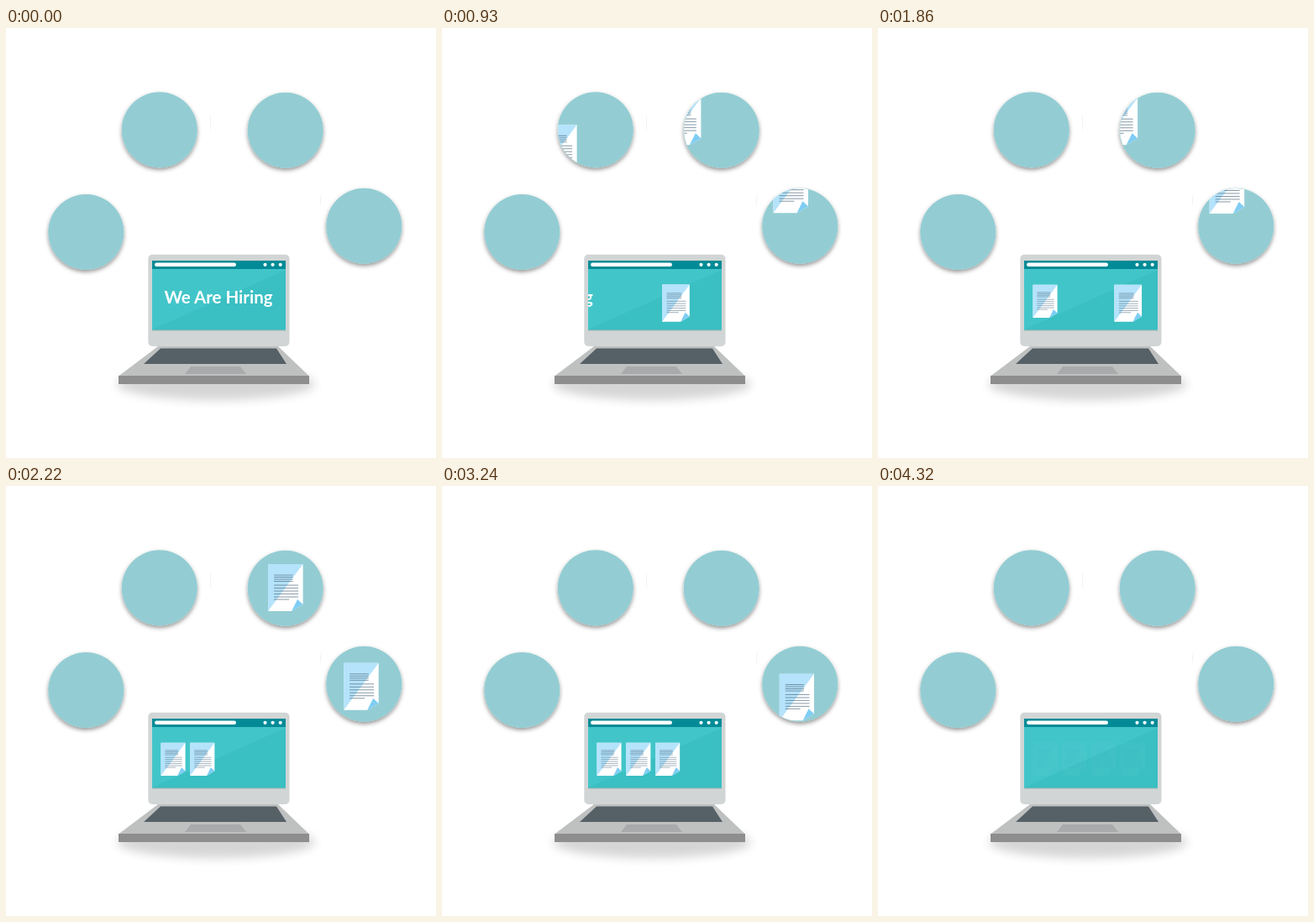
These frames come from a looping animation (512 by 512 pixels, 4.38 s). An HTML page:

```html
<!DOCTYPE html>
<html lang="en">
<head>
<meta charset="utf-8">
<title>We Are Hiring</title>
<style>
html, body { margin: 0; width: 100%; height: 100%; overflow: hidden; background: #fff; }
svg { display: block; width: 100vw; height: 100vh; }
#label { font: 700 20.5px Lato, "Open Sans", sans-serif; fill: #fff; text-anchor: middle; }
</style>
</head>
<body>
<svg viewBox="0 0 512 512">
  <defs>
    <filter id="drop" x="-30%" y="-30%" width="160%" height="160%">
      <feDropShadow dx="0" dy="2.5" stdDeviation="2.6" flood-color="#000" flood-opacity=".42"/>
    </filter>
    <filter id="soft" x="-30%" y="-80%" width="160%" height="260%">
      <feGaussianBlur stdDeviation="6"/>
    </filter>
    <clipPath id="screen"><rect x="174" y="287" width="159" height="73"/></clipPath>
    <clipPath id="windows">
      <rect x="174" y="287" width="159" height="73"/>
      <circle cx="95.3" cy="243" r="44.7"/>
      <circle cx="182.8" cy="121.3" r="44.7"/>
      <circle cx="332.7" cy="121.8" r="44.7"/>
      <circle cx="426.3" cy="235.8" r="44.7"/>
    </clipPath>
    <g id="doc">
      <path d="M0 0H41.5V48L28 56H0Z" fill="#fff"/>
      <path d="M0 0H41.5L0 56Z" fill="#b5e3fb"/>
      <path d="M28 56L35 42L41.5 48Z" fill="#7fcdf4"/>
      <path d="M7 13H29.5M7 15.5H29.5M7 18H29.5M7 20.5H29.5M7 25H36M7 28.5H36M7 32H36M7 35.5H36M7 39H36M7 42H25"
        fill="none" stroke="#4f6c80" stroke-width=".7"/>
    </g>
  </defs>

  <rect width="512" height="512" fill="#fff"/>
  <path d="M244 100Q242 112 244 125Z" fill="#f1f1f1"/>
  <path d="M376 195Q373 204 374 215Z" fill="#f1f1f1"/>

  <g id="discs" fill="#93cdd3" filter="url(#drop)">
    <circle cx="95.3" cy="243" r="45"/>
    <circle cx="182.8" cy="121.3" r="45"/>
    <circle cx="332.7" cy="121.8" r="45"/>
    <circle cx="426.3" cy="235.8" r="45"/>
  </g>

  <ellipse cx="250" cy="424" rx="118" ry="19" fill="#000" opacity=".16" filter="url(#soft)"/>
  <rect x="169.3" y="269.7" width="168.2" height="109.3" rx="5" fill="#d1d5d5"/>
  <rect x="174" y="277" width="159" height="83" fill="#42c5c9"/>
  <path d="M174 359L333 288V360H174Z" fill="#3abfc2"/>
  <rect x="174" y="277" width="159" height="10" fill="#028b96"/>
  <rect x="174" y="359.5" width="159" height="1" fill="#a5b5b6"/>
  <rect x="177" y="279.5" width="97" height="4.6" rx="2.3" fill="#fff"/>
  <g fill="#fff">
    <circle cx="308.5" cy="281.8" r="2.1"/>
    <circle cx="317.6" cy="281.8" r="2.1"/>
    <circle cx="326.7" cy="281.8" r="2.1"/>
  </g>
  <path d="M181 379H324L361 414.5H134Z" fill="#bfc1c1"/>
  <path d="M184 381.5H322L334 400H164Z" fill="#566067"/>
  <path d="M220 403H279L286 412H213Z" fill="#a8aaab"/>
  <rect x="134" y="414" width="227" height="10" fill="#8e8e8f"/>

  <g clip-path="url(#screen)"><text id="label" x="253" y="328">We Are Hiring</text></g>
  <g id="docs" clip-path="url(#windows)"></g>
</svg>
<script>
const LOOP = 4380, STEP = 30, START = 285, PERIOD = 927, MOVE = 927;
const stops = [[71, 214.5], [157.5, 89.5], [309, 93], [402, 207]];
const bends = [[54, 150], [203, 64], [392, 94]];
const slot = n => [184.5 + 34.8 * n, 305.7];

const clamp = x => Math.min(1, Math.max(0, x));
const ease = x => (1 - Math.cos(Math.PI * clamp(x))) / 2;
const ramp = (t, a, b) => clamp((t - a) / (b - a));
const mix = (a, b, u) => a.map((v, i) => v + (b[i] - v) * u);

// Point on a Bezier curve of any degree
function curve(points, u) {
  while (points.length > 1)
    points = points.slice(1).map((p, i) => mix(points[i], p, u));
  return points[0];
}

// Place of the document that starts on disc i
function place(i, t) {
  const shift = Math.max(0, Math.floor((t - START) / PERIOD));
  const at = i + shift;
  const u = ease((t - START - shift * PERIOD) / MOVE);
  const end = slot(3 - i);
  if (at > 3) return [...end, 0.7];
  if (at < 3) return [...curve([stops[at], bends[at], stops[at + 1]], u), 1];
  const route = [stops[3], [407, 275], [270 + end[0] / 4, 316], end];
  return [...curve(route, u), 1 - 0.3 * u ** 1.5];
}

const layer = document.getElementById("docs");
const label = document.getElementById("label");
const docs = stops.map(() => {
  const use = document.createElementNS("http://www.w3.org/2000/svg", "use");
  use.setAttribute("href", "#doc");
  return layer.appendChild(use);
});

function draw(t) {
  layer.setAttribute("opacity", ramp(t, 65, 240) * (1 - ramp(t, 4080, 4328)));
  docs.forEach((doc, i) => {
    const [x, y, s] = place(i, t);
    doc.setAttribute("transform", `translate(${x} ${y}) scale(${s})`);
  });
  label.setAttribute("x", 253 - 165 * ease(ramp(t, 600, 1050)));
}

const begin = performance.now();
function tick() {
  const t = (performance.now() - begin) % LOOP;
  const held = Math.min(4320, Math.floor(t / STEP) * STEP);
  draw(held < 90 ? 0 : held);
  requestAnimationFrame(tick);
}
draw(0);
requestAnimationFrame(tick);
</script>
</body>
</html>
```
